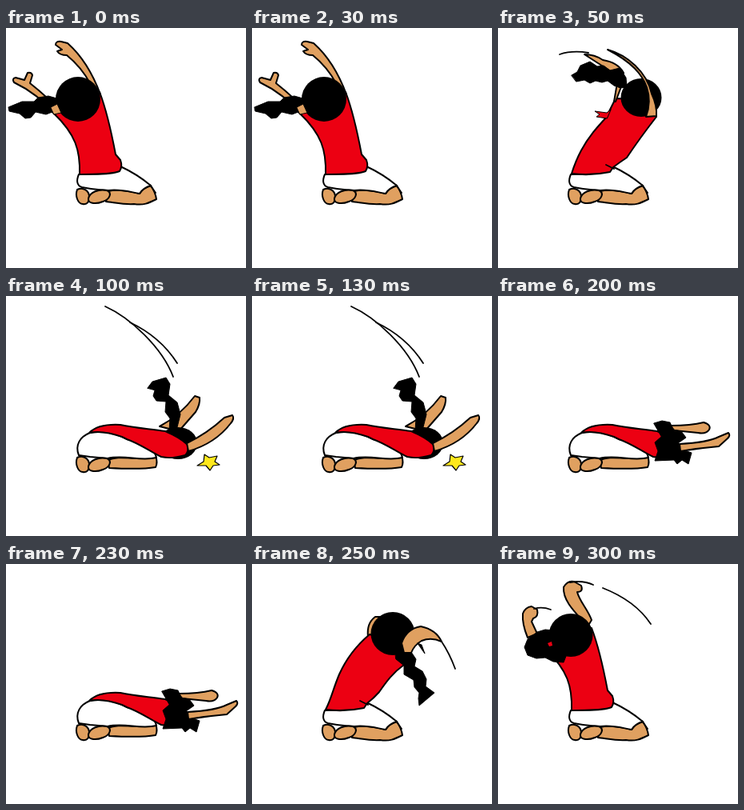
An HTML page with a canvas for the animation above (0.35 s loop, 300 by 300 pixels).

```html
<!DOCTYPE html>
<html lang="en">
<head>
<meta charset="utf-8">
<title>Bowing figure</title>
<style>
html, body { margin: 0; width: 100%; height: 100%; overflow: hidden; background: #fff; }
canvas { display: block; }
</style>
</head>
<body>
<canvas id="stage" width="300" height="300"></canvas>
<script>
const ctx = document.getElementById('stage').getContext('2d');
const RED = '#ec0012', SKIN = '#e0a060', HAIR = '#000', YELLOW = '#ffe81c';
const STEP = 50;
ctx.lineJoin = ctx.lineCap = 'round';

function shape(fill, d, width = 2) {
  const path = new Path2D(d);
  if (fill) { ctx.fillStyle = fill; ctx.fill(path); }
  ctx.lineWidth = width;
  ctx.strokeStyle = '#000';
  if (width) ctx.stroke(path);
}
const line = (d, width = 1.8) => shape(null, d, width);

function oval(x, y, rx, ry) {
  ctx.beginPath();
  ctx.ellipse(x, y, rx, ry, 0, 0, 7);
  ctx.fillStyle = HAIR;
  ctx.fill();
}

function feet() {
  shape(SKIN, 'M89 202C97 198 104 204 104 211C104 217 102 221 96 220C90 220 86 210 89 202Z');
  shape(SKIN, 'M103 213C105 205 116 201 126 203C133 206 130 214 121 217C111 221 102 219 103 213Z');
}

function kneel() {
  shape(SKIN, 'M128 204C140 201 155 204 167 207Q171 200 181 197Q187 206 188 214C178 219 172 222 160 220C148 221 135 218 125 217Z');
  shape('#fff', 'M91 183C88 190 88 197 95 199C108 202 117 202 128 203C143 201 155 205 167 207Q171 200 181 197C168 186 156 179 143 173L120 182Z');
  line('M180 196L187 206');
  feet();
}

function upright() {
  shape(RED, 'M60 107Q85 90 117 80C125 101 131 126 137 158L143 165Q146 173 142 179C131 184 109 182 92 183C93 153 87 133 60 107Z');
}

// Both bent poses share the hem; each gives its own back and front edge.
function leaning(back, front) {
  shape(RED, 'M92 182' + back + front + 'Q152 168 144 174L140 180Q116 185 92 182Z');
  line('M135 171L145 176');
}

function lie() {
  shape(SKIN, 'M127 205C145 198 162 207 187 200Q190 208 187 214C170 217 148 216 129 215Z');
  shape('#fff', 'M91 199C86 187 92 176 105 171C122 168 139 172 151 179C170 184 186 190 188 202C168 207 148 198 127 203L105 201Z');
  feet();
}

function back() {
  shape(RED, 'M104 171C112 163 125 160 143 161C161 165 179 166 199 169Q218 177 227 186Q229 194 224 199Q207 204 194 201C181 195 168 185 151 179L145 176C131 171 118 168 104 171Z');
}

function farArm() {
  shape(SKIN, 'M216 162C231 162 245 161 257 158Q267 161 264 167Q260 173 250 171L220 168Z');
}

function nearArm() {
  shape(SKIN, 'M227 185C246 184 264 182 276 176L288 171Q291 174 287 178L276 188Q252 190 228 194Z');
}

const poses = [
  () => { // arms flung back
    kneel();
    shape(SKIN, 'M60 107C47 91 31 78 10 68Q7 63 12 62L23 65L27 56Q32 55 33 59L30 69C44 80 56 90 69 106Z');
    shape(SKIN, 'M105 69C98 56 87 43 76 34Q67 34 64 29L70 27L62 21Q62 16 69 17L77 19C94 34 108 56 118 83L111 88Z');
    upright();
    oval(90, 89, 28, 28);
    shape(HAIR, 'M67 89L53 85L40 87L35 92L20 92L3 99L4 104L17 107L24 113L31 112L37 105L50 108L63 103Z', 1);
    shape(SKIN, 'M56 99L64 95L69 106L60 108Z', 1);
  },
  () => { // swinging forward
    kneel();
    leaning('Q97 166 104 153C113 136 124 124 135 112L147 88', 'L190 90L198 111Q177 138 161 162');
    shape(RED, 'M141 102L136 106L121 104L127 108L123 111L136 113Z', 1);
    oval(179, 87, 25.5, 24);
    shape(SKIN, 'M108 33Q121 33 131 40Q150 43 157 56L153 76L147 92L145 92Q148 76 150 60Z');
    shape(HAIR, 'M92 59L99 55L103 47L115 42L124 48L132 47L140 53L152 50L160 62L161 74L153 75L145 72L137 66L130 68L122 66L115 69L108 65L98 67Z', 1);
    shape(SKIN, 'M137 27C162 34 186 55 192 82Q199 97 198 110L185 111Q192 92 186 74C180 58 168 43 137 27Z');
    line('M77 33C89 29 101 29 113 31');
  },
  () => { // hitting the floor
    lie();
    shape(SKIN, 'M192 163C207 155 224 141 236 125L242 127Q243 135 237 145L216 169Z');
    oval(215, 184, 24, 20);
    back();
    shape(HAIR, 'M177 115L183 107L200 102L205 110L203 124L214 133L218 148L213 168L204 168L205 153L199 145L200 132L188 131L184 125L186 118Z', 1);
    shape(SKIN, 'M226 184C245 175 260 164 273 152L283 149Q286 153 281 159C268 176 249 188 228 194Z');
    shape(YELLOW, 'M248 198L254 202L264 200L261 207L267 211L259 212L255 218L250 212L239 212L247 207Z', 1.2);
    line('M124 13C155 27 195 64 209 101');
    line('M155 33Q193 51 214 84');
  },
  () => { // impact
    lie();
    farArm();
    shape(HAIR, 'M205 168L226 170L235 179L236 190L241 197L238 210L226 203L205 190Z', 1);
    back();
    shape(HAIR, 'M186 147L198 143L194 138L207 136L216 139L219 146L222 150L220 160L225 167L234 175L231 184L224 184L203 171L199 161L205 157L195 153L200 147Z', 1);
    nearArm();
    shape(YELLOW, 'M246 197Q250 203 257 201Q267 201 274 196Q271 203 273 207L280 212L272 217L275 224Q267 220 263 221L255 228Q255 221 250 219Q241 219 232 221Q240 216 241 212L235 206Q245 206 246 197Z', 1.6);
    line('M203 79C222 102 240 132 247 158');
    line('M232 98C246 120 254 139 258 157');
  },
  () => { // flat
    lie();
    farArm();
    back();
    shape(HAIR, 'M195 159L205 156L215 158L219 167L229 169L235 177L225 184L230 192L242 196L238 210L230 205L224 210L220 205L196 206L200 194L196 183L204 176Z', 1);
    nearArm();
  },
  () => { // rising
    kneel();
    shape(SKIN, 'M145 91Q143 74 154 66L163 66L155 91Z');
    leaning('C99 169 101 157 109 138Q122 109 147 88', 'L187 100L190 126C176 136 168 147 159 160');
    oval(176, 87, 27.5, 27);
    shape(HAIR, 'M179 109L190 106L199 110L205 119L203 128L213 134L218 144L217 153L228 161L209 177L208 168L209 161L203 154L202 145L190 138L190 127L180 119Z', 1);
    shape(SKIN, 'M190 111L187 99Q193 81 211 78Q230 82 237 97Q224 91 212 96Q203 101 199 111Z');
    shape(HAIR, 'M207 99L212 101L216 112L211 105Z', 1);
    line('M237 97Q247 112 254 131');
  },
  () => { // arms thrown up
    kneel();
    shape(SKIN, 'M37 92Q30 75 31 62Q34 54 42 53L49 57Q51 66 44 68L42 72L49 87Z');
    shape(SKIN, 'M105 70C93 57 81 44 82 29Q87 20 95 22L104 27Q107 35 99 35C102 47 112 56 117 70L111 80Z');
    upright();
    oval(91, 89, 27.5, 27);
    shape(HAIR, 'M70 83L59 82L49 85L37 94L33 104L37 114L48 118L59 117L69 122L82 123L87 110Z', 1);
    shape(RED, 'M62 99L67 97L68 102L64 103Z', 0);
    line('M45 56Q55 53 66 57');
    line('M90 23Q106 20 119 26');
    line('M131 30C154 39 177 54 191 75');
  }
];

const start = performance.now();
function tick() {
  const time = performance.now() - start;
  ctx.fillStyle = '#fff';
  ctx.fillRect(0, 0, 300, 300);
  poses[Math.floor(time / STEP) % poses.length]();
  requestAnimationFrame(tick);
}
tick();
</script>
</body>
</html>
```
